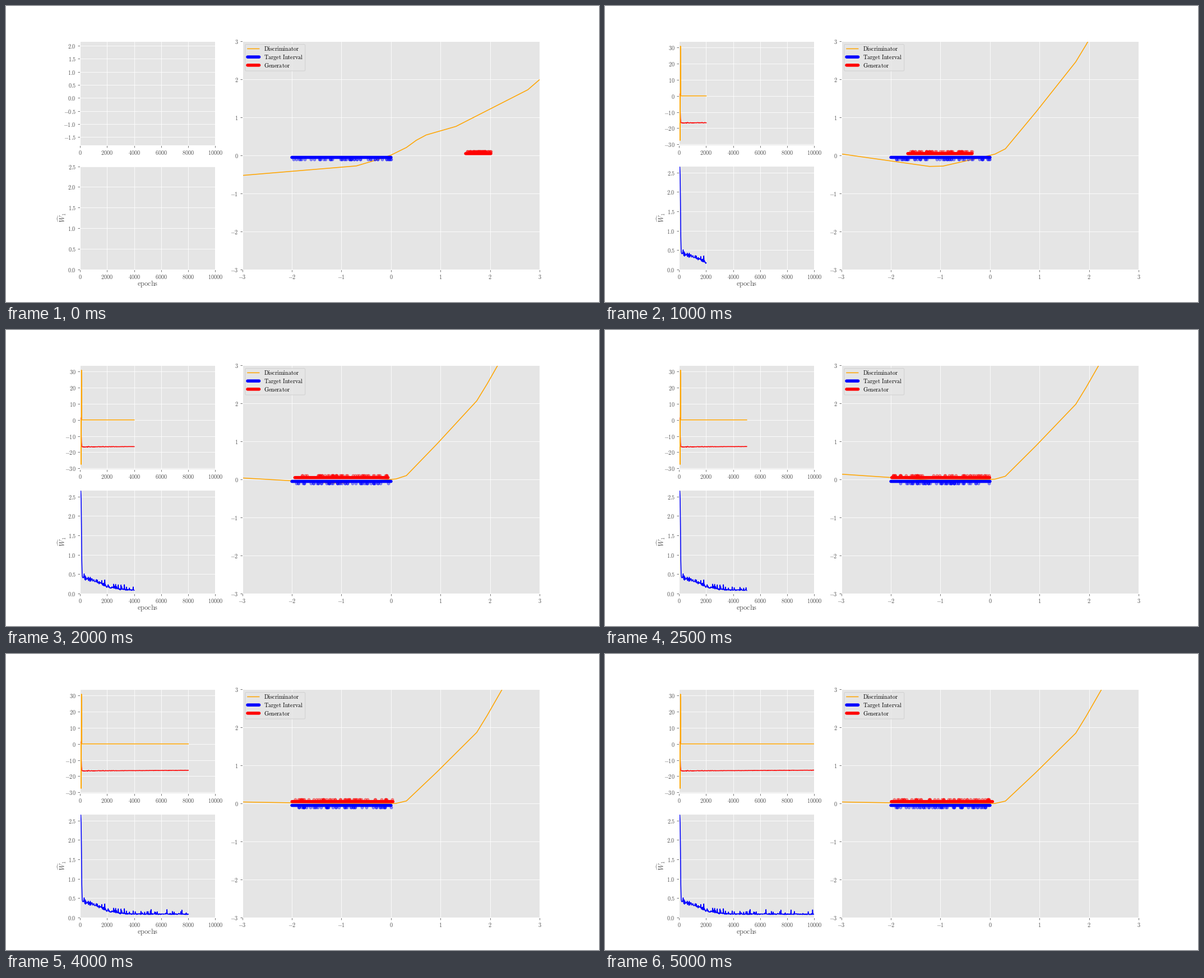
Animation, 1058 px wide and 529 px high, one loop 5500 ms. Source, as a matplotlib script:

```python
import numpy as np
import matplotlib.pyplot as plt
from matplotlib.animation import FuncAnimation
from matplotlib.patches import FancyBboxPatch

W, H = 1058, 529
EM = 10.3
GREY, PANEL = "#555555", "#E5E5E5"

plt.rcParams.update({
    "font.family": "Liberation Serif", "mathtext.fontset": "cm", "font.size": EM,
    "axes.facecolor": PANEL, "axes.edgecolor": "white", "axes.linewidth": 1.03,
    "axes.grid": True, "axes.axisbelow": True,
    "grid.color": "white", "grid.linewidth": 0.82, "grid.linestyle": "-",
    "xtick.color": GREY, "ytick.color": GREY,
    "xtick.major.size": 3.6, "ytick.major.size": 3.6,
    "xtick.major.pad": 3.6, "ytick.major.pad": 3.6,
    "xtick.major.width": 0.82, "ytick.major.width": 0.82,
    "lines.linewidth": 1.55,
})

UNTRAINED = [(-3, -0.525), (-0.7, -0.275), (-0.3, -0.12), (0, 0.01), (0.31, 0.21),
             (0.51, 0.4), (0.71, 0.54), (1.31, 0.765), (2.76, 1.73), (3, 2)]


def step_down(x, mid, width):
    return 1 / (1 + np.exp((x - mid) / width))


def critic(k):
    """Corner points of the discriminator after k thousand epochs."""
    if k == 0:
        return UNTRAINED
    decay = np.exp(-(k - 1) / 2)
    left = 0.04 + 0.1 * np.sin(np.pi * k / 2)
    dip = -0.3 * step_down(k, 3.6, 0.5)
    knee = 0.06 + 0.19 * decay
    bend = 1.84 + 1.03 * decay
    top = 2.25 - 0.467 * decay
    slope = (3 - bend) / (top - 1.73)
    return [(-3, left), (-1.22, dip), (-0.95, dip * 0.97), (-0.1, dip * 0.1),
            (0.1, 0.06 * decay), (0.31, knee), (0.93, knee + 0.425 * (bend - knee)),
            (1.73, bend), (1.94, bend + 0.2 * slope), (top + 0.2, 3 + 0.2 * slope)]


def gen_range(k):
    """The generator jumps onto the interval, then widens to fill it."""
    center = -1.02 + 0.005 * k if k else 1.76
    half = max(0.254, 1.02 * (1 - np.exp(-0.402 * k ** 1.33)))
    return center - half, center + half


def histories():
    rng = np.random.default_rng(4)
    t = np.arange(0, 10001, 25)
    settled = t > 200
    unrest = np.exp(-(t / 1900) ** 2.2)

    dist = 0.085 + 0.32 * unrest + 2.27 * step_down(t, 105, 14)
    jitter = rng.normal(0, 0.008 + 0.02 * unrest ** 0.5).clip(-0.06, 0.06)
    spikes = (rng.random(t.size) < 0.11) * rng.uniform(0.03, 0.12, t.size)
    dist += settled * (np.maximum(jitter, -0.01 - 0.1 * unrest) + spikes)

    gen = -16.7 + 0.4 * t / 10000 + 18.5 * step_down(t, 75, 14)
    gen += settled * rng.normal(0, 0.05 + 0.06 * unrest)

    disc = np.zeros(t.size)
    disc[3:5] = -27.57, 30.8
    return t, gen, disc, dist


def rm(s):
    return r"$\mathrm{" + s.replace(" ", r"\ ") + "}$"


def decimals(n):
    return lambda v, _: f"${v:.{n}f}$"


def set_scale(ax, ticks, lo, hi, n):
    ax.set_yticks(ticks)
    ax.yaxis.set_major_formatter(decimals(n))
    ax.set_ylim(lo, hi)


fig = plt.figure(figsize=(W / 72, H / 72), dpi=72, facecolor="white")
fig.subplots_adjust(left=0.125, right=0.9, bottom=0.11, top=0.88)
gs = fig.add_gridspec(2, 3, wspace=0.2, hspace=0.2)
loss_ax = fig.add_subplot(gs[0, 0])
dist_ax = fig.add_subplot(gs[1, 0])
main_ax = fig.add_subplot(gs[:, 1:])

for ax in (loss_ax, dist_ax):
    ax.set_xticks(range(0, 10001, 2000))
    ax.xaxis.set_major_formatter(decimals(0))
    ax.set_xlim(0, 10000)
main_ax.set_xticks(range(-3, 4))
main_ax.xaxis.set_major_formatter(decimals(0))
main_ax.set_xlim(-3, 3)
set_scale(main_ax, range(-3, 4), -3, 3, 0)

gen_line, = loss_ax.plot([], [], color="red")
disc_line, = loss_ax.plot([], [], color="orange")
dist_line, = dist_ax.plot([], [], color="blue")

BAR = dict(linewidth=5.6, solid_capstyle="round")
DOT = dict(linestyle="none", marker="o", markersize=4.8, markeredgewidth=1.03, alpha=0.4)
critic_line, = main_ax.plot([], [], color="orange")
real_dots, = main_ax.plot([], [], color="blue", **DOT)
fake_dots, = main_ax.plot([], [], color="red", **DOT)
main_ax.plot([-2, 0], [-0.05, -0.05], color="blue", snap=False, **BAR)
gen_bar, = main_ax.plot([], [], color="red", snap=False, **BAR)

# Overlay in pixel units for the legend and axis titles
page = fig.add_axes([0, 0, 1, 1])
page.set_xlim(0, W)
page.set_ylim(H, 0)
page.axis("off")
page.add_patch(FancyBboxPatch((426.85, 68.6), 106.9, 47.4,
                              boxstyle="round,pad=0,rounding_size=2.06",
                              facecolor=PANEL, edgecolor="0.8", linewidth=1.03, alpha=0.8))
entries = [("Discriminator", "orange", {}), ("Target Interval", "blue", BAR), ("Generator", "red", BAR)]
for i, (name, color, style) in enumerate(entries):
    base = 80.2 + 14.7 * i
    page.plot([431, 451.6], [base - 3.8] * 2, color=color, snap=False, **style)
    page.text(459.8, base, rm(name), color="black", va="baseline")
page.text(252.8, 500, rm("epochs"), fontsize=1.2 * EM, color=GREY, ha="center", va="baseline")
page.text(105.6, 377.8, r"$\widehat{W}_1$", fontsize=1.2 * EM, color=GREY, rotation=90,
          rotation_mode="anchor", ha="center", va="baseline")

T, GEN, DISC, DIST = histories()


def update(k):
    if k == 0:
        set_scale(loss_ax, np.arange(-3, 5) / 2, -1.81, 2.16, 1)
        set_scale(dist_ax, np.arange(6) / 2, 0, 2.513, 1)
    else:
        set_scale(loss_ax, range(-30, 31, 10), -30.5, 33.7, 0)
        set_scale(dist_ax, np.arange(6) / 2, 0, 2.673, 1)

    n = 40 * k + 1 if k else 0
    for line, data in ((gen_line, GEN), (disc_line, DISC), (dist_line, DIST)):
        line.set_data(T[:n], data[:n])

    critic_line.set_data(*zip(*critic(k)))
    lo, hi = gen_range(k)
    gen_bar.set_data([lo, hi], [0.05, 0.05])
    rng = np.random.default_rng(100 + k)
    real_dots.set_data(rng.uniform(-2, 0, 50), np.full(50, -0.1))
    fake_dots.set_data(rng.uniform(lo, hi, 50), np.full(50, 0.1))
    return gen_line, disc_line, dist_line, critic_line, real_dots, fake_dots, gen_bar


anim = FuncAnimation(fig, update, frames=11, interval=500, repeat=True, repeat_delay=0, blit=False)
plt.show()
```
